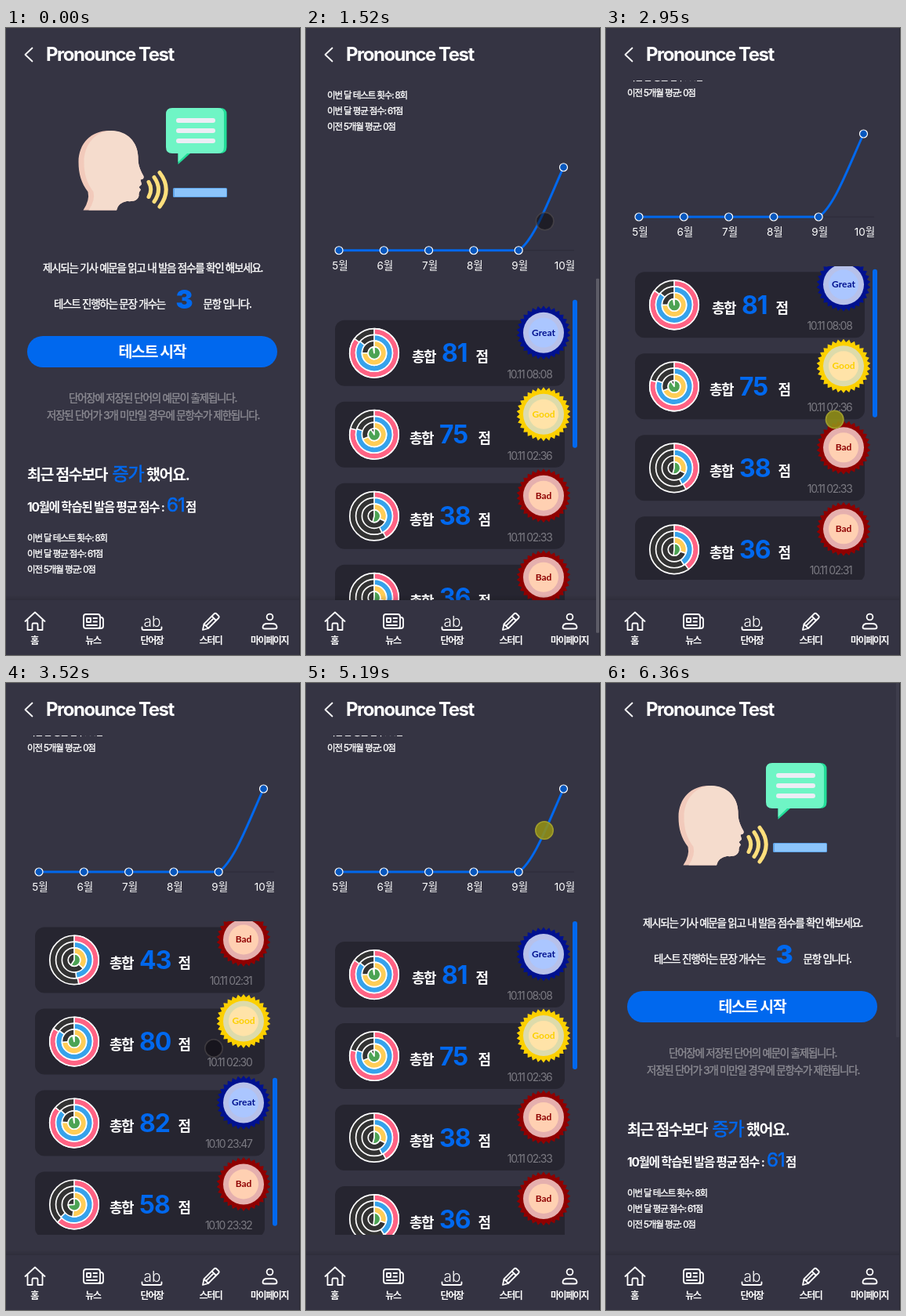
Recreate the animation shown at these times as an HTML page. Size 375x800 px, loop 6760 ms.

```html
<!DOCTYPE html>
<html lang="ko">
<head>
<meta charset="utf-8">
<title>Pronounce Test</title>
<style>
html, body { margin: 0; width: 100%; height: 100%; overflow: hidden; background: #353443; }
svg { display: block; width: 100%; height: 100%; }
text { font-family: Inter, "Noto Sans CJK KR", "Noto Sans CJK", sans-serif; white-space: pre; }
.badge { font-family: Lato, sans-serif; }
.icon { fill: none; stroke: #fff; stroke-width: 1.8; stroke-linecap: round; stroke-linejoin: round; }
</style>
</head>
<body>
<svg viewBox="0 0 375 800" preserveAspectRatio="none">
  <defs>
    <clipPath id="pageClip"><rect y="67" width="375" height="663"/></clipPath>
    <clipPath id="listClip"><rect x="27" y="912" width="320" height="400"/></clipPath>
    <linearGradient id="shade" x2="0" y2="1">
      <stop offset="0" stop-color="#000" stop-opacity="0"/>
      <stop offset="1" stop-color="#000" stop-opacity=".13"/>
    </linearGradient>
  </defs>
  <rect width="375" height="800" fill="#353443"/>
  <g id="header"><path d="M33.5 25.5L24.5 34L33.5 42.5" class="icon"/></g>
  <g clip-path="url(#pageClip)">
    <g id="page">
      <g id="head"></g>
      <g fill="none" stroke="#ffdf7c" stroke-width="5" stroke-linecap="round">
        <path d="M182 196.500Q187.500 206 182 215.500"/>
        <path d="M189 190.500Q200 206 189 221.500"/>
        <path d="M196 184.500Q212.500 206 196 228"/>
      </g>
      <rect x="213" y="204" width="69" height="12" rx="1.500" fill="#5fa4e8"/>
      <rect x="215" y="205" width="66" height="10" rx="1" fill="#8cc5fb"/>
      <path fill="#22dd98" d="M212 102H273Q281.500 102 281.500 110V152Q281.500 160 273 160H235L219.500 174V160H212Z"/>
      <path fill="#6ff5c5" d="M212 102H270Q278 102 278 110V152Q278 160 270 160H231L219.500 171V160H212Q204 160 204 152V110Q204 102 212 102Z"/>
      <path fill="none" stroke="#ecedf5" stroke-width="6" stroke-linecap="round" d="M220 118H264M220 131H264M220 144H264"/>
      <rect x="27" y="393" width="319" height="40" rx="20" fill="#0068ee"/>
      <g id="copy"></g>
      <g id="chart"></g>
      <g clip-path="url(#listClip)"><g id="list"></g></g>
      <rect id="listBar" x="340" y="912" width="6" height="189" rx="3" fill="#0068ee"/>
    </g>
  </g>
  <rect y="723" width="375" height="7" fill="url(#shade)"/>
  <rect y="730" width="375" height="70" fill="#343342"/>
  <g id="nav">
    <path class="icon" d="M24.500 757L37 745.500L49.500 757M27.500 755V768H33.500V761Q33.500 759.500 35 759.500H39Q40.500 759.500 40.500 761V768H46.500V755"/>
    <path class="icon" d="M102 748H117Q120 748 120 751V763Q120 766 117 766H102Q99 766 99 763V751Q99 748 102 748ZM120 752H121Q124 752 124 755V763Q124 766 121 766H117M103 753H108V758H103ZM111.500 753H116M111.500 757.500H116M103 762H116"/>
    <path class="icon" d="M173.500 764.500V766Q173.500 768 175.500 768H196.500Q198.500 768 198.500 766V764.500"/>
    <path class="icon" d="M251 768L252.500 760.500L265.500 747.500Q267 746 268.500 747.500L271 750Q272.500 751.500 271 753L258 766ZM262.500 750.500L268 756M252.500 760.500L258 766M256 762L264.500 753.500"/>
    <circle class="icon" cx="336.500" cy="751.500" r="3.900"/>
    <path class="icon" d="M330 766.500Q327.500 766.500 327.500 764.500Q328 760 333 760H340Q345 760 345.500 764.500Q345.500 766.500 343 766.500Z"/>
  </g>
  <rect x="374" width="1" height="800" fill="#282732"/>
  <rect id="pageBar" x="370" width="4" height="452" rx="1" fill="#5d5c67"/>
  <circle id="cursor" r="11.200" stroke-width="1.600"/>
</svg>
<script>
const BLUE = '#0068ee', WHITE = '#fff', GREY = '#8b8a92';
const LOOP = 6760, FRAME = 69, PAGE_MAX = 608, LIST_MAX = 446;
const $ = id => document.getElementById(id);

function add(parent, tag, attrs, content) {
  const el = document.createElementNS('http://www.w3.org/2000/svg', tag);
  for (const k in attrs) el.setAttribute(k, attrs[k]);
  if (content) el.textContent = content;
  return parent.appendChild(el);
}

function label(parent, content, x, y, size, weight, fill, gap = 0, extra) {
  return add(parent, 'text', {
    x, y, fill, 'font-size': size, 'font-weight': weight, 'letter-spacing': gap, ...extra
  }, content);
}

// a thin outline stands in for the missing medium weight
const medium = (parent, content, x, y, size, fill, gap) =>
  label(parent, content, x, y, size, 400, fill, gap, { stroke: fill, 'stroke-width': size / 34 });

function buildHead() {
  const front = 'C155 131 168 146 168.5 164C168.5 174 170 179 175.5 189Q176.5 193 171.500 193.500L173 199.500' +
    'L169.500 203L172 206.500Q169 209 169.500 214C168 221 161 221.500 154 221Q143 223 141 232.500Z';
  [['#f2cabb', 0], ['#f5dccd', 7]].forEach(([fill, d]) => add($('head'), 'path', {
    fill,
    d: `M${98.5 + d} 232.5Q${107 + d} 220 ${104.5 + d} 209C${96 + d} 198 ${92.5 + d} 186 ${92.5 + d} 171` +
      `C${92.5 + d} 147 ${109 + d} 131 ${131 + d / 2} 131` + front
  }));
}

function buildCopy() {
  const g = $('copy');
  const body = (s, x, y, fill = WHITE) => medium(g, s, x, y, 13.5, fill, -1.24);
  const bold = (s, x, y) => label(g, s, x, y, 19.5, 700, WHITE, -1.45);

  body('제시되는 기사 예문을 읽고 내 발음 점수를 확인 해보세요.', 47, 311);
  body('테스트 진행하는 문장 개수는', 61, 357);
  label(g, '3', 216.5, 358, 33, 900, BLUE);
  body('문항 입니다.', 251.5, 357);
  bold('테스트 시작', 143.5, 420);
  body('단어장에 저장된 단어의 예문이 출제됩니다.', 80, 477, GREY);
  body('저장된 단어가 3개 미만일 경우에 문항수가 제한됩니다.', 52, 499, GREY);
  bold('최근 점수보다', 27, 577);
  medium(g, '증가', 135.5, 577, 23, BLUE, -1.2);
  bold('했어요.', 179, 577);
  label(g, '10월에 학습된 발음 평균 점수 :', 27, 617, 15.5, 700, WHITE, -1.2);
  medium(g, '61', 205, 617, 24, BLUE, -1);
  label(g, '점', 229, 617, 15.5, 700, WHITE);
  ['이번 달 테스트 횟수: 8회', '이번 달 평균 점수: 61점', '이전 5개월 평균: 0점'].forEach((s, i) =>
    medium(g, s, 27, 655 + 20 * i, 11.5, WHITE, -1.1));
}

function buildChart() {
  const g = $('chart'), base = 849, top = 743;
  const px = i => 42 + 57.3 * i;
  add(g, 'path', { d: `M42 ${base}H342`, stroke: '#2c2b38' });
  add(g, 'path', {
    d: `M42 ${base}H${px(4)}C291 ${base - 13} 309 ${top + 43} ${px(5)} ${top}`,
    fill: 'none', stroke: BLUE, 'stroke-width': 3
  });
  for (let i = 0; i < 6; i++) {
    add(g, 'circle', {
      cx: px(i), cy: i < 5 ? base : top, r: 5, fill: '#0757bd', stroke: WHITE, 'stroke-width': 1.2
    });
    label(g, i + 5 + '월', px(i) + 1.5, 873, 13.5, 400, WHITE, 0, { 'text-anchor': 'middle' });
  }
}

const badges = {
  Great: { edge: '#00118f', ring: '#b7c1ea', core: '#abc6ff' },
  Good: { edge: '#fcd000', ring: '#dddbab', core: '#ffe3a8' },
  Bad: { edge: '#8f0000', ring: '#e5b0ae', core: '#ffd0b2' }
};
const grade = score => score > 80 ? 'Great' : score > 70 ? 'Good' : 'Bad';

const results = {
  scores: [81, 75, 38, 36, 43, 80, 82, 58],
  dates: ['10.11 08:08', '10.11 02:36', '10.11 02:33', '10.11 02:31',
    '10.11 02:31', '10.11 02:30', '10.10 23:47', '10.10 23:32']
};

const polar = (r, turn) => {
  const a = (turn - .25) * 2 * Math.PI;
  return (r * Math.cos(a)).toFixed(2) + ' ' + (r * Math.sin(a)).toFixed(2);
};

function rings(parent, y, score) {
  const g = add(parent, 'g', { transform: `translate(87 ${y})`, stroke: WHITE, 'stroke-width': 1.7 });
  const bias = [4, 5, -6, 16];
  ['#ff6384', '#36a2eb', '#ffcd56', '#4ca354'].forEach((fill, i) => {
    const r = 31.2 - 7.8 * i, share = Math.min(.97, (score + bias[i]) / 100);
    add(g, 'circle', { r, fill: '#333' });
    add(g, 'path', {
      d: `M0 0L${polar(r, 0)}A${r} ${r} 0 ${share > .5 ? 1 : 0} 1 ${polar(r, share)}Z`,
      fill, 'stroke-linejoin': 'round'
    });
  });
}

function badge(parent, y, name) {
  const { edge, ring, core } = badges[name];
  const g = add(parent, 'g', { transform: `translate(303 ${y})` });
  const teeth = 30, pts = [];
  for (let i = 0; i < teeth * 2; i++) pts.push(polar(i % 2 ? 30.5 : 34.5, i / teeth / 2));
  add(g, 'polygon', { points: pts.join(' '), fill: edge });
  add(g, 'circle', { r: 26, fill: ring });
  add(g, 'circle', { r: 19, fill: core });
  label(g, name, 0, 4, 12, 700, edge, 0, { 'text-anchor': 'middle', class: 'badge' });
}

function buildList() {
  const g = $('list');
  results.scores.forEach((score, i) => {
    const y = 938 + 104 * i, inset = score % 10 === 1 ? 3 : 0;
    add(g, 'rect', { x: 37, y, width: 293, height: 84, rx: 12, fill: '#262530' });
    rings(g, y + 42, score);
    label(g, '총합', 132 + inset, y + 53, 18, 700, WHITE, -1.5);
    label(g, score, 170 + inset, y + 53.5, 32, 700, BLUE, -1);
    label(g, '점', 219.5 - inset, y + 53, 18, 700, WHITE);
    label(g, results.dates[i], 313.5, y + 74, 14, 400, '#7b7a82', -1.3, { 'text-anchor': 'end' });
    badge(g, y + 16, grade(score));
  });
}

function buildBars() {
  label($('header'), 'Pronounce Test', 51, 42, 24, 700, WHITE, -1.5);
  const g = $('nav');
  label(g, 'ab', 175.5, 764, 19, 300, WHITE);
  ['홈', '뉴스', '단어장', '스터디', '마이페이지'].forEach((s, i) =>
    label(g, s, 36 + 75 * i, 786, 12, 700, WHITE, -1.4, { 'text-anchor': 'middle' }));
}

// smooth 0 to 1 over a span of time
function ease(t, start, span) {
  const p = Math.min(1, Math.max(0, (t - start) / span));
  return p * p * (3 - 2 * p);
}

const pageAt = t => PAGE_MAX * (ease(t, 1032, 580) - ease(t, 5175, 600));
const listAt = t => LIST_MAX * (ease(t, 2800, 795) - ease(t, 4093, 620));
const barAlpha = t => ease(t, 1000, 40) - ease(t, 1930, 140) + ease(t, 5175, 60) - ease(t, 6280, 100);

const moves = [
  { at: 80, span: 350, x: 301, y: 530 },
  { at: 1050, span: 260, x: 304, y: 200, drag: true },
  { at: 1310, span: 690, x: 307, y: 414 },
  { at: 2260, span: 490, x: 299, y: 640 },
  { at: 2750, span: 350, x: 280, y: 275, drag: true },
  { at: 3100, span: 410, x: 265, y: 466 },
  { at: 4070, span: 380, x: 306, y: 626, drag: true },
  { at: 4490, span: 680, x: 304, y: 188 },
  { at: 5175, span: 600, x: 322, y: 588, drag: true },
  { at: 6080, span: 120, x: 375, y: 440 }
];

function cursorAt(t) {
  let x = 360, y = 800, down = false;
  for (const m of moves) {
    const p = ease(t, m.at, m.span);
    x += (m.x - x) * p;
    y += (m.y - y) * p;
    if (m.drag && t >= m.at && t < m.at + m.span) down = true;
  }
  return { x, y, down };
}

function draw(now) {
  const t = Math.floor((Math.min(now, 6360) + 6) / FRAME) * FRAME;
  const page = pageAt(t), { x, y, down } = cursorAt(t);
  $('page').setAttribute('transform', `translate(0 ${-page})`);
  $('list').setAttribute('transform', `translate(0 ${-listAt(t)})`);
  $('listBar').setAttribute('y', 912 + listAt(t - 35) / LIST_MAX * 211);
  $('pageBar').setAttribute('y', page / PAGE_MAX * 344);
  $('pageBar').setAttribute('opacity', barAlpha(t));

  const c = $('cursor');
  c.setAttribute('cx', x);
  c.setAttribute('cy', y);
  c.setAttribute('fill', down ? 'rgba(146,143,22,.88)' : 'rgba(8,6,10,.5)');
  c.setAttribute('stroke', down ? '#a09d2c' : 'rgba(85,80,82,.6)');
  c.setAttribute('visibility', t >= 2 * FRAME && t < 6200 ? 'visible' : 'hidden');
}

buildHead();
buildCopy();
buildChart();
buildList();
buildBars();
const start = performance.now();
function tick() {
  draw((performance.now() - start) % LOOP);
  requestAnimationFrame(tick);
}
tick();
</script>
</body>
</html>
```
